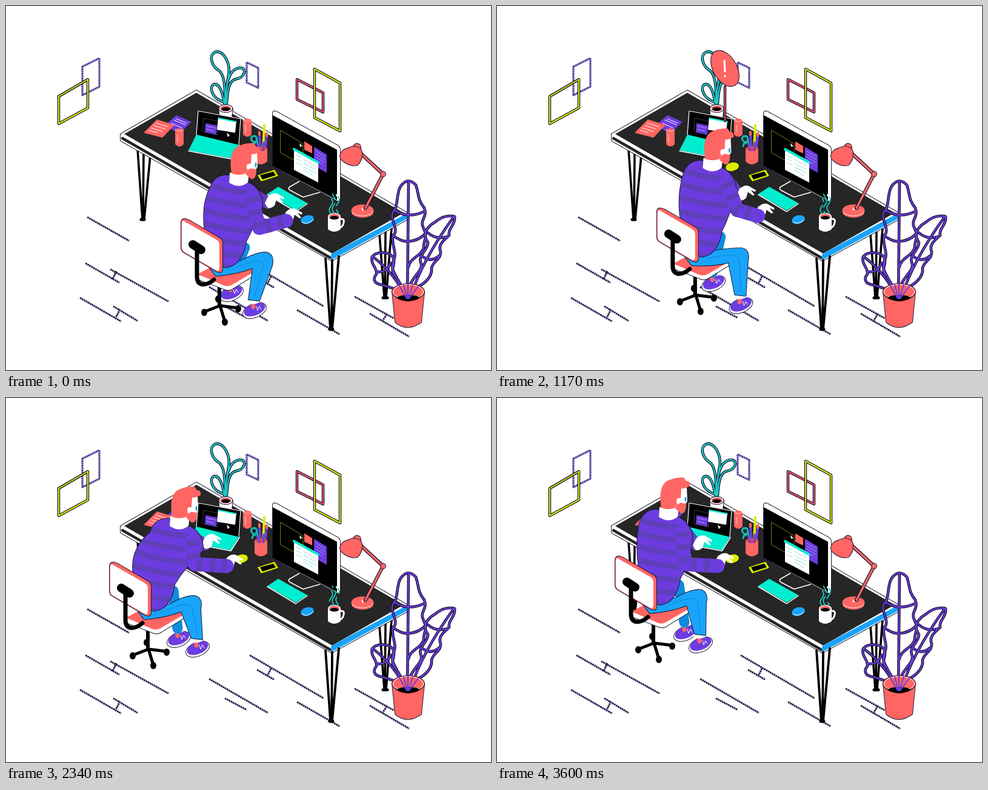
An HTML page with a canvas for the animation above (3.63 s loop, 800 by 600 pixels).

```html
<!DOCTYPE html>
<html lang="en">
<head>
<meta charset="utf-8">
<title>Two desks at once</title>
<style>
html, body { margin: 0; width: 100%; height: 100%; overflow: hidden; background: #fff; }
canvas { display: block; }
</style>
</head>
<body>
<canvas id="stage" width="800" height="600"></canvas>
<script>
const g = document.getElementById('stage').getContext('2d');
const CORAL = '#ff6663', TEAL = '#00eed0', BLUE = '#18a4fa', PURPLE = '#6c3ce0', VIOLET = '#5f3fba',
  YELLOW = '#dced00', COAL = '#262626', INK = '#17122e', WHITE = '#fff', BLACK = '#000';
const LOOP = 3630;

const fill = (d, color) => { g.fillStyle = color; g.fill(new Path2D(d)); };
const line = (d, color, width, dash = []) => {
  g.strokeStyle = color;
  g.lineWidth = width;
  g.setLineDash(dash);
  g.stroke(new Path2D(d));
};
const edged = (d, color) => { line(d, INK, 2, [1.5, 1.5]); fill(d, color); };
const rod = (d, color, width) => { line(d, INK, width + 2.4); line(d, color, width); };
const oval = (x, y, rx, ry = rx, turn = 0) => {
  const p = new Path2D();
  p.ellipse(x, y, rx, ry, turn, 0, 7);
  return p;
};
const moved = (x, y, draw) => { g.save(); g.translate(x, y); draw(); g.restore(); };
const clamp = v => Math.max(0, Math.min(1, v));

function room() {
  line(`M134,348L203,387M131,424L187,456M172,434L268,487M182,437L176,450M122,481L190,520
    M177,495L217,519M188,500L181,514M402,424L524,495M414,448L442,464M437,446L431,458
    M335,463L432,519M361,495L397,514M480,501L550,541M575,479L640,515M600,507L665,545M628,508L621,519`,
    '#2c2350', 3, [3, .7]);
  line('M126,100L154,86V133L126,147Z', '#50409a', 3.2, [3, .5]);
  rod('M87,149L135,121V168L87,194Z', YELLOW, 2);
  line('M397,93L416,102V135L397,126Z', '#50409a', 3.2, [3, .5]);
  rod('M480,121L523,143V175L480,154Z', '#e9546b', 2);
  rod('M509,104L551,127V206L509,184Z', YELLOW, 2);
}

function desk() {
  line(`M217,236L225,351M238,246L228,351M227,242L226,351
    M616,376L624,480M636,366L627,480M626,372L625,480`, BLACK, 3.6);
  line('M223,352H228M622,481H629', BLACK, 5);
  edged('M314,139L189,211V222L537,420L662,352V341Z', WHITE);
  fill('M314,143L195,211L538,408L656,341Z', COAL);
  line('M192,218L535,415', COAL, 4.5);
  fill('M536,409L661,342V351L536,419Z', BLUE);
  line('M527,416L535,532M549,413L538,532M538,419L537,532', BLACK, 3.8);
  line('M534,533H539', BLACK, 5);
}

function smallPlant() {
  rod(`M362,165C362,135 366,122 368,108C368,88 356,72 345,76C333,82 340,100 352,107Q363,116 361,165
    M364,160C366,130 370,122 381,120C394,117 397,104 388,102C374,101 366,115 364,135
    M358,158C340,152 334,134 343,129C352,127 357,142 360,160`, '#18cfc6', 2.2);
  edged('M351,169L353,184H372L374,169Z', WHITE);
  edged(oval(362.5, 169, 11, 6), WHITE);
  fill(oval(362.5, 169, 9, 4.5), '#d9504f');
  fill(oval(362.5, 170, 7, 3), BLACK);
}

function can(x, y) {
  moved(x, y, () => {
    fill('M-7,0V24Q0,31 7,24V0Q0,-5 -7,0Z', CORAL);
    line('M-7,0Q0,5 7,0M-3,8V20', '#ffd0cc', 1);
  });
}

function leftSide() {
  fill('M281,180L306,191L285,211L263,196Z', PURPLE);
  line('M277,188L296,196M273,193L290,201M281,186L298,193', WHITE, 1);
  fill('M249,187L278,196L258,217L227,209Z', CORAL);
  line('M248,193L267,199M244,197L263,203M240,201L258,207M236,205L250,209', WHITE, 1);
  can(286, 204);
  can(398, 188);
  fill('M317,172L388,186L385,229L314,212Z', BLACK);
  line('M314,212L317,173L387,186L384,229', WHITE, 1.2);
  line('M326,185L350,190L349,213L325,207Z', '#444', .8);
  fill('M329,193L348,197L347,212L328,208Z', PURPLE);
  line('M331,198L345,201M331,203L342,206', '#b9a4f0', 1);
  fill('M350,184L380,190L378,209L348,204Z', WHITE);
  line('M350,185L380,191', TEAL, 2);
  fill('M364,209L369,213L366,216Z', WHITE);
  fill('M314,212L384,229L371,251L301,238Z', TEAL);
  line('M301,239L371,252L385,230', WHITE, 1.5);
}

function monitor() {
  line('M484,289L468,298Q464,301 469,304L490,315L518,307', WHITE, 1.6);
  edged('M440,177Q440,172 446,174L547,230Q551,232 551,237V316Q551,322 546,321L440,264Z', WHITE);
  fill('M440,180L546,237V320L440,264Z', BLACK);
  line('M453,205L490,227V262L453,242Z', '#77801a', 1);
  fill('M492,223L505,231V243L492,237Z', CORAL);
  fill('M508,232L529,245V275L508,263Z', PURPLE);
  line('M511,239L526,248M511,244L526,253M511,249L526,258M511,254L522,261', '#a68bf0', 1);
  fill('M475,234L515,256V291L475,270Z', WHITE);
  line('M475,236L515,258', TEAL, 4);
  line('M479,246L487,250M479,252L487,256M479,258L487,262M491,253L511,264M491,259L511,270M491,265L511,276M491,271L506,279', '#9bdcd6', 1);
  fill('M484,226L489,231L485,232Z', WHITE);
  fill(oval(545, 312, 1, 2), WHITE);
}

function deskThings() {
  line('M411,226Q401,220 406,215Q414,212 414,222L417,238M414,222Q407,225 406,231', '#16bdb5', 3);
  line('M426,197L424,240', YELLOW, 4);
  line('M418,212L420,240M430,214L427,240', PURPLE, 4);
  line('M418,208V212M430,210V214', CORAL, 4);
  fill('M410,234V256Q420,266 431,256V234Z', CORAL);
  fill(oval(420.5, 235, 10, 4), '#d84c4c');
  line('M414,228L418,238M425,225L424,238', PURPLE, 3);
  fill(oval(388, 265, 11, 7, -.2), YELLOW);
  fill('M415,279L443,270L449,280L421,289Z', YELLOW);
  fill('M419,279L441,273L445,279L423,286Z', BLACK);
  fill('M449,298L497,325L478,337L431,310Z', TEAL);
  line('M431,311L478,339L497,326', WHITE, 1.5);
  fill(oval(497, 352, 11, 7, -.25), BLUE);
  line('M488,356Q497,362 507,352', WHITE, 1);
  line('M552,351Q560,350 556,360Q554,366 550,364', WHITE, 3);
  fill('M531,347V368Q541,376 552,368V347Z', WHITE);
  fill(oval(541.5, 347, 10.5, 6), WHITE);
  fill(oval(541.5, 347, 8.5, 4.5), CORAL);
  fill(oval(541.5, 349, 7.5, 3), BLACK);
  fill(oval(588, 340, 18, 9), CORAL);
  line(oval(588, 337, 18, 9), WHITE, .8);
  fill(oval(588, 336, 18, 9), CORAL);
  rod('M583,241L622,277L593,333', CORAL, 3.5);
  edged(oval(622, 277, 4), CORAL);
  edged(oval(579, 233, 6), CORAL);
  edged('M551,248Q552,237 565,234Q577,228 586,237Q590,251 580,262Q566,266 552,252Z', CORAL);
  fill('M586,332L590,335L588,338Z', WHITE);
}

function bigPlant() {
  rod(`M663,480C640,440 633,432 639,420C646,408 636,395 638,380C650,368 632,352 638,340C648,330 643,310 651,297
    Q663,281 676,295C682,312 678,318 690,333C696,348 682,352 688,365C697,380 688,388 689,398C686,412 666,415 664,430
    M662,482L664,290M638,378Q652,389 664,388Q680,387 691,376M640,336Q664,352 691,338
    M664,480C660,450 688,440 685,425C678,410 695,405 696,390C686,376 694,364 708,356Q724,343 740,347
    C742,360 728,368 731,378C722,386 712,394 717,405C718,418 704,420 702,432C704,448 686,462 674,464
    M667,480Q686,420 738,348M696,374Q710,386 729,380M686,412Q700,424 714,412
    M658,480C645,465 638,466 622,460C604,458 606,448 611,442C613,432 600,425 604,413C612,404 632,404 639,415
    C644,428 630,436 644,446M660,480Q640,440 606,414M612,438Q628,440 634,424`, PURPLE, 2.2);
  edged('M637,471L642,521Q662,538 685,521L690,471Z', CORAL);
  edged(oval(663.5, 471, 26.5, 13), CORAL);
  line(oval(663.5, 471, 25, 12), WHITE, 1);
  fill('M641,478Q663,490 686,478Q678,486 663.5,487Q648,486 641,478Z', BLACK);
  fill(oval(663.5, 481, 18, 4.5), BLACK);
  line('M661,482L648,460M662,482L656,460M663,482V458M664,482L671,460M665,482L680,462', PURPLE, 2);
}

function steam(t) {
  [[536, 318], [541, 309], [547, 313]].forEach(([x, top], i) => {
    let d = `M${x},342`;
    for (let y = 340; y >= top; y -= 2) d += `L${x + 2.8 * Math.sin(y / 4.2 + i * .5)},${y}`;
    g.lineDashOffset = -t / LOOP * 5 * 36 + i * 11;
    line(d, '#16cfc2', 1.8, [29, 7]);
    g.lineDashOffset = 0;
  });
}

function alertSign(t) {
  const age = t - 793;
  if (age <= 0 || t > 2100) return;
  const size = 1 - Math.exp(-.011 * age) * Math.cos(age * Math.PI / 150);
  g.globalAlpha = clamp((2100 - t) / 240);
  moved(376, 189, () => {
    g.scale(size, size);
    rod('M0,0V-56', '#d9504f', 2);
    edged(oval(0, -86, 32, 19, Math.PI / 3), CORAL);
    line('M-1,-99L0,-81M0,-74V-73', WHITE, 3);
  });
  g.globalAlpha = 1;
}

// Pose: time, chair, neck, far wrist, elbow, wrist, knee drop, ankle, far ankle
const atMonitor = [0, 0, 386, 287, 432, 325, 418, 366, 462, 354, 0, 408, 484, 370, 456];
const alerted = [0, 0, 393, 281, 412, 319, 415, 367, 448, 357, 0, 408, 484, 370, 456];
const hands = [328, 242, 312, 274, 364, 277];
const poses = [
  [0, ...atMonitor],
  [330, ...atMonitor],
  [560, ...alerted],
  [1010, ...alerted],
  [1440, -91, -64, 279, 218, 362, 288, 342, 268, 384, 311, 34, 371, 446, 312, 396],
  [1860, -114, -82, 287, 207, ...hands, 0, 314, 396, 283, 380],
  [2340, -118, -80, 288, 207, ...hands, 0, 314, 396, 283, 380],
  [2820, -113, -83, 279, 203, ...hands, -4, 332, 391, 306, 372],
  [3300, -94, -90, 285, 192, ...hands, 0, 334, 389, 309, 370],
  [LOOP, -94, -90, 285, 192, ...hands, 0, 334, 389, 309, 370]
];

// Monotone cubic interpolation keeps motion flowing without overshoot.
function poseAt(t) {
  const i = poses.findIndex((p, n) => n && t <= p[0]) - 1;
  const slope = (n, k) => poses[n] && poses[n + 1]
    ? (poses[n + 1][k] - poses[n][k]) / (poses[n + 1][0] - poses[n][0]) : 0;
  const tangent = (n, k) => {
    const a = slope(n - 1, k), b = slope(n, k);
    return a * b > 0 ? 2 * a * b / (a + b) : 0;
  };
  const [a, b] = [poses[i], poses[i + 1]], span = b[0] - a[0], u = (t - a[0]) / span, v = 1 - u;
  return a.map((from, k) => from * v * v * (1 + 2 * u) + b[k] * u * u * (3 - 2 * u)
    + span * u * v * (v * tangent(i, k) - u * tangent(i + 1, k)));
}

function shoe(x, y) {
  moved(x, y, () => {
    edged(oval(2, 18, 20, 11, -.4), WHITE);
    fill(oval(2, 16, 18.5, 10, -.4), PURPLE);
    line('M-1,5L0,12', CORAL, 7);
    line('M5,11L7,18L10,11L13,16', WHITE, 1);
    line('M-6,2Q1,5 8,1', WHITE, 8);
  });
}

function hand(x, y) {
  moved(x, y, () => fill(
    'M-5,-4L0,-15Q8,-22 15,-20L27,-13L26,-10L19,-13L25,-5L22,-4L14,-10L11,0Q4,6 -1,3Z', WHITE));
}

function chairBase() {
  line('M353,494L327,504M353,494L361,520M353,494L385,498M353,494L350,482', BLACK, 5);
  line('M352,460V494', BLACK, 6);
  [[327, 505], [361, 521], [383, 499], [350, 483]].forEach(([x, y]) => fill(oval(x, y, 5, 6), BLACK));
  edged('M316,442L365,461L411,437V443L372,467Q365,470 358,466L318,451Z', WHITE);
  fill('M316,442L350,424L406,430Q414,434 408,439L372,460Q366,463 360,461Z', CORAL);
}

function chairBack() {
  edged('M296,351Q289,350 289,358V398Q289,404 295,407L348,438Q357,441 357,434V391Q357,384 350,381L302,353Z', CORAL);
  fill('M293,354Q290,354 290,359V398Q290,403 295,406L347,436Q352,438 352,431V394Q352,388 347,385L296,356Z', WHITE);
  line('M308,393L322,402', BLACK, 14);
  line('M315,399V446Q315,458 325,459Q334,459 343,451', BLACK, 7);
}

function head() {
  fill('M-17,-12L-18,4Q-2,15 13,4L16,-18Z', WHITE);
  fill('M15,-46L28,-45L29,-22L24,-14L8,-14Z', WHITE);
  fill('M13,-20L27,-18Q27,0 18,-2L9,-10Z', CORAL);
  fill('M-14,-11C-17,-32 -16,-47 -5,-55Q8,-62 23,-61L27,-55Q34,-56 33,-47Q25,-42 19,-43L18,-27Q12,-28 12,-19L10,-12Q0,-6 -14,-11Z', CORAL);
  fill(oval(14, -22, 3, 5), WHITE);
  fill(oval(26, -25, 1.5, 4), '#20a9d8');
}

function man(t) {
  const [, cx, cy, nx, ny, fx, fy, ex, ey, wx, wy, drop, ax, ay, bx, by] = poseAt(t);
  const n = (x, y) => `${nx + x},${ny + y} `;
  const c = (x, y) => `${cx + x},${cy + y} `;
  const typing = t < 400 || t > 1860 ? 1.8 * Math.sin(t / 36) : 0;

  shoe(bx, by);
  line(`M${c(394, 398)}L${bx},${by}`, '#108cdd', 17);
  moved(cx, cy, chairBase);
  shoe(ax, ay);
  const leg = `M${c(332, 426)}L${c(388, 420)}Q${c(412, 406 + drop)}${c(428, 406 + drop)}
    Q${c(443, 408 + drop)}${c(439, 428 + drop)}L${ax + 10},${ay + 2}L${ax - 8},${ay}
    L${c(407, 432 + drop * .8)}Q${c(380, 442 + drop / 2)}${c(346, 445)}Z`;
  edged(leg, BLUE);
  line(`M${c(372, 434)}Q${c(426, 410 + drop)}${c(425, 428 + drop)}L${ax + 2},${ay - 6}`, '#0d7fc8', .8);

  line(`M${n(24, 24)}L${fx},${fy}`, VIOLET, 19);
  hand(fx, fy + 4 - typing);
  const torso = `M${n(-18, -8)}Q${n(-42, -10)}${n(-50, 14)}Q${c(322, 330)}${c(328, 370)}L${c(332, 420)}
    L${c(362, 431)}Q${c(390, 428)}${c(396, 388)}Q${c(408, 365)}${n(37, 44)}Q${n(38, 16)}${n(14, 4)}Q${n(-2, 14)}${n(-18, 3)}Z`;
  edged(torso, PURPLE);
  g.save();
  g.clip(new Path2D(torso));
  for (let i = 0; i < 8; i++) {
    const f = (i + .6) / 7, x = nx + (cx + 362 - nx) * f, y = ny + (cy + 432 - ny) * f;
    line(`M${x - 75},${y - 14}Q${x - 5},${y + 16} ${x + 70},${y + 8}`, VIOLET, 9);
  }
  g.restore();

  hand(wx, wy + typing);
  const arm = `M${n(20, 28)}Q${ex - 5},${ey - 16} ${ex},${ey}L${wx},${wy}`;
  line(arm, PURPLE, 23);
  g.lineCap = 'butt';
  line(arm, VIOLET, 23, [9, 12]);
  g.lineCap = 'round';
  moved(nx, ny, head);
  moved(cx, cy, chairBack);
}

function draw(now) {
  // Steps of 30 ms, the first of every six held for two.
  const raw = now % LOOP, part = raw % 180;
  const t = raw - part + (part < 60 ? 0 : Math.floor(part / 30) * 30);
  g.clearRect(0, 0, 800, 600);
  g.lineJoin = 'round';
  g.lineCap = 'butt';
  room();
  g.lineCap = 'round';
  desk();
  smallPlant();
  leftSide();
  monitor();
  deskThings();
  bigPlant();
  steam(t);
  alertSign(t);
  man(t);
}

const start = performance.now();
(function tick() {
  draw(performance.now() - start);
  requestAnimationFrame(tick);
})();
</script>
</body>
</html>
```
